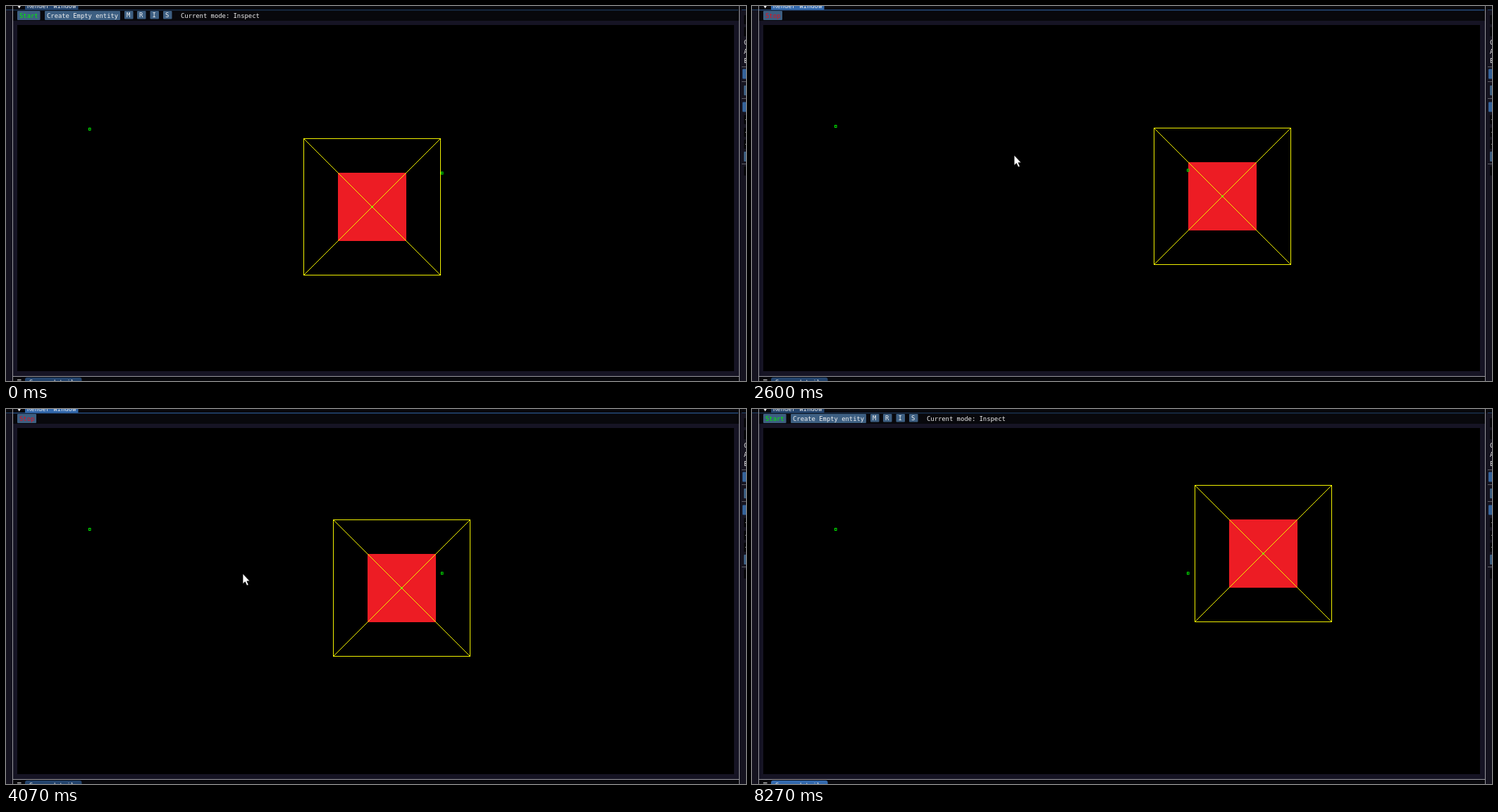
An HTML page that plays this animation: 1050 px wide and 533 px high, repeating every 8670 ms.

```html
<!DOCTYPE html>
<html>
<head>
<meta charset="utf-8">
<style>
html, body { margin: 0; width: 100%; height: 100%; overflow: hidden; background: #15131f; }
svg { display: block; }
text { font: 8.86px "DejaVu Sans Mono", monospace; fill: #f0f0f0; white-space: pre; }
.crisp { shape-rendering: crispEdges; }
</style>
</head>
<body>
<svg id="stage" width="1050" height="533" viewBox="0 0 1050 533">
  <g id="panels" class="crisp"></g>
  <g id="tabs"></g>
  <g id="side"></g>
  <g id="editBar"></g>
  <g id="playBar"></g>
  <g id="box" fill="none" stroke="#f0f000">
    <rect x="-48.5" y="-48.5" width="97" height="97" fill="#ed1c24" stroke="none"/>
    <rect x="-97" y="-97" width="194" height="194"/>
    <path d="M-97 -97L97 97M97 -97L-97 97"/>
    <rect x="-1" y="-1" width="2" height="2" stroke="#80f000"/>
  </g>
  <g id="points" fill="none" stroke="#00f000">
    <rect x="117.5" y="169.5" width="2.5" height="3"/>
    <rect x="617.5" y="232" width="2.5" height="3"/>
  </g>
  <path id="cursor" d="M0 0V14.5L3.3 11.6L5.8 17L8.2 16L5.8 10.7H10Z" fill="#fff" stroke="#000" stroke-width=".7"/>
</svg>
<script>
const LOOP = 8670, STEP = 200 / 3;
const PLAY = 860, STOP = 5060;
const BUTTON = '#3d5f82', HOVER = '#3f78b4', ACTIVE = '#2f80d0';
const FOCUSED = '#3369ad', UNFOCUSED = '#23436c', EDGE = '#96969c';

const $ = id => document.getElementById(id);

function add(parent, tag, attrs, content) {
  const el = document.createElementNS('http://www.w3.org/2000/svg', tag);
  for (const k in attrs) el.setAttribute(k, attrs[k]);
  if (content) el.textContent = content;
  $(parent).appendChild(el);
  return el;
}
const rect = (parent, x, y, width, height, fill, rx = 0) =>
  add(parent, 'rect', { x, y, width, height, fill, rx });
const label = (parent, x, y, str, fill = '#f0f0f0') =>
  add(parent, 'text', { x, y, style: 'fill:' + fill }, str);
function button(parent, x, width, str, fill, height = 13) {
  const face = rect(parent, x, 7, width, height, BUTTON, 1);
  label(parent, x + 3, 10.5 + height / 2, str, fill);
  return face;
}

// Window frames
rect('panels', 0, 0, 1050, 533, '#15131f');
rect('panels', 0, 0, 9, 5, '#09090d');
rect('panels', 0, 5, 9, 1, UNFOCUSED);
rect('panels', 10, 0, 1030, 21, '#08080c');
rect('panels', 10, 21, 1030, 505, '#161424');
rect('panels', 16, 27, 1017, 492, '#000');
rect('panels', 10, 527, 1030, 6, '#08080c');
rect('panels', 9, 0, 1, 533, EDGE);
rect('panels', 1040, 0, 1, 533, EDGE);
rect('panels', 10, 526, 1030, 1, EDGE);
rect('panels', 1041, 0, 9, 5, '#09090d');
rect('panels', 1044, 5, 6, 1, UNFOCUSED);

// Tabs
const topTab = rect('tabs', 27, -8, 75.5, 13.5, UNFOCUSED, 1);
const topLine = rect('tabs', 10, 5.3, 1029, 1, UNFOCUSED);
const lowTab = rect('tabs', 27, 528, 80.5, 14, UNFOCUSED, 3);
label('tabs', 30, 2.5, 'Render Window');
label('tabs', 33, 538, 'Scene details');
add('tabs', 'path', { d: 'M16 -1H21.5L18.7 3.5Z', fill: '#f0f0f0' });
add('tabs', 'path', { d: 'M16 531.5H21.5', stroke: '#f0f0f0' });

// Edge of the right-hand panel
for (const y of [13, 30, 155, 173, 190, 228]) rect('side', 1047, y, 5, 13, '#050508', 1);
for (const y of [161, 179, 196]) rect('side', 1049, y, 1, 1, '#999');
[['C', 55], ['A', 68], ['E', 81]].forEach(([c, y]) => label('side', 1047, y, c));
for (const y of [89.5, 136.5]) rect('side', 1045, y, 7, 14, '#35639a', 1);
for (const y of [113, 207]) rect('side', 1047, y, 5, 14, BUTTON, 1);
for (const y of [86, 107, 131, 224]) rect('side', 1044, y, 6, 1, '#606068');

// Toolbars
const start = button('editBar', 16, 32.5, 'Start', '#00f000');
button('editBar', 55, 107, 'Create Empty entity');
[['M', 168], ['R', 186], ['I', 204.5], ['S', 223]]
  .forEach(([c, x]) => button('editBar', x, 12.5, c, '#f0f0f0', 11.5));
label('editBar', 248, 17, 'Current mode: Inspect');
const stop = button('playBar', 16, 27, 'Stop', '#e01020');

// Each key is time followed by values
function lerpKeys(keys, t) {
  if (t <= keys[0][0]) return keys[0].slice(1);
  for (let i = 1; i < keys.length; i++) {
    const a = keys[i - 1], b = keys[i];
    if (t < b[0]) {
      const u = (t - a[0]) / (b[0] - a[0]);
      return a.slice(1).map((v, j) => v + (b[j + 1] - v) * u);
    }
  }
  return keys[keys.length - 1].slice(1);
}

// Parabolic flight between turning points
function flight(keys, t) {
  if (t <= keys[0][0]) return keys[0][1];
  for (let i = 1; i < keys.length; i++) {
    const [t0, y0] = keys[i - 1], [t1, y1] = keys[i];
    if (t < t1) {
      const u = (t - t0) / (t1 - t0);
      return y1 < y0 ? y1 + (y0 - y1) * (1 - u) ** 2 : y0 + (y1 - y0) * u * u;
    }
  }
  return keys[keys.length - 1][1];
}

const walk = [[1621, 725], [1864, 783.5], [2186, 706], [2442, 706], [2770, 627],
  [2916, 662], [3541, 512], [3907, 600], [4400, 481.5]];
const hops = [[900, 206], [1250, 271], [1590, 271], [1940, 206], [2300, 271], [2920, 271],
  [3250, 213.5], [3520, 252], [3790, 214], [4170, 291], [4487, 228], [4730, 260]];
const pointer = [[200, -6, 16], [530, 35, 11], [800, 35, 11], [1265, 372, 212], [4000, 372, 212],
  [4066, 337, 234], [4200, 219, 180], [4730, 35, 11], [5810, 35, 11], [6333, 88, 29]];

const show = (el, on) => el.style.display = on ? '' : 'none';
const move = (el, x, y) => el.setAttribute('transform', `translate(${x} ${y})`);
const paint = (el, fill) => el.setAttribute('fill', fill);

function draw(ms) {
  const t = Math.floor((ms + 4) / STEP) * STEP;
  const playing = t >= PLAY && t < STOP;
  const fresh = t < PLAY;

  let x = 725.5, y = 206;
  if (fresh) { x = 520; y = 286; }
  if (playing) { x = lerpKeys(walk, t)[0]; y = flight(hops, t); }
  move($('box'), Math.round(x) - .5, Math.round(y) - .5);
  move($('points'), 0, fresh ? 4 : 0);

  const [cx, cy] = lerpKeys(pointer, t);
  const seen = t >= 199 && t < 6390;
  show($('cursor'), seen);
  move($('cursor'), Math.round(cx), Math.round(cy));

  const over = w => seen && cx >= 16 && cx < 16 + w && cy >= 7 && cy < 20;
  const pressed = (t > 799 && t < PLAY) || (t > 4999 && t < STOP);
  const face = w => over(w) ? (pressed ? ACTIVE : HOVER) : BUTTON;
  paint(start, face(32));
  paint(stop, face(27));
  show($('editBar'), !playing);
  show($('playBar'), playing);

  const topFocus = t > 799 && t < 8260 ? FOCUSED : UNFOCUSED;
  paint(topTab, topFocus);
  paint(topLine, topFocus);
  paint(lowTab, t >= 8260 ? FOCUSED : UNFOCUSED);
}

const begin = performance.now();
function tick() {
  draw((performance.now() - begin) % LOOP);
  requestAnimationFrame(tick);
}
tick();
</script>
</body>
</html>
```
